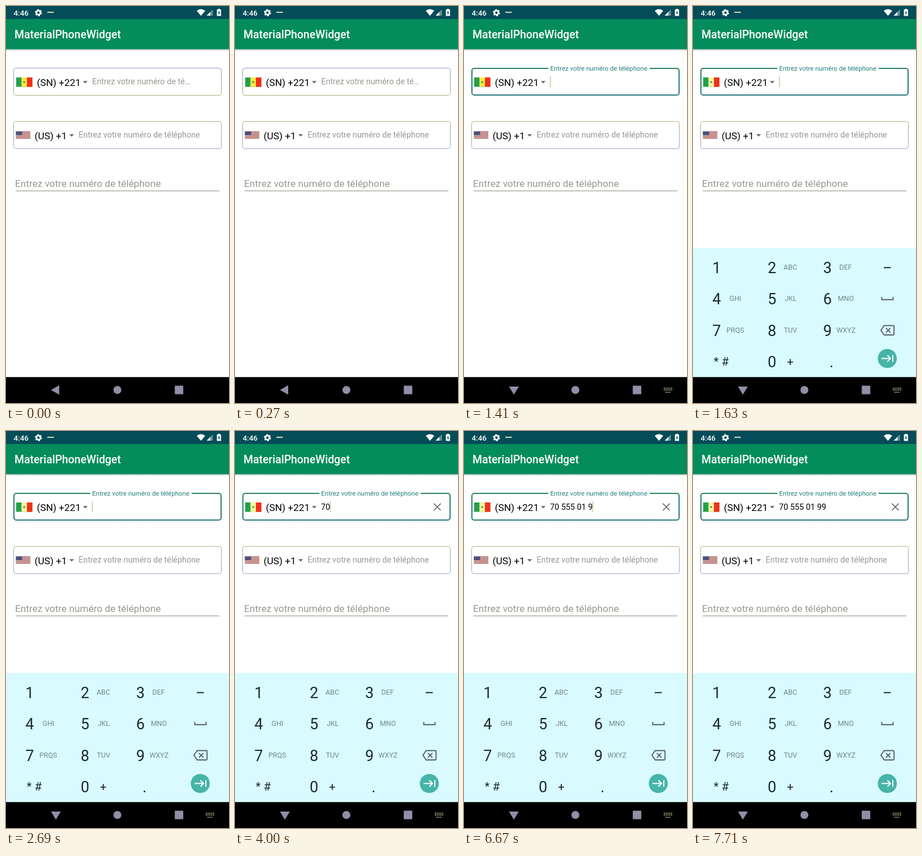
Animation, 394 px wide and 700 px high, one loop 8 s. Source, as an HTML page:

```html
<!DOCTYPE html>
<html lang="fr">
<head>
<meta charset="utf-8">
<title>MaterialPhoneWidget</title>
<style>
  html, body { margin: 0; width: 100%; height: 100%; overflow: hidden; background: #fff; }
  svg { display: block; width: 394px; height: 700px; font-family: Roboto, sans-serif; }
  .hint { fill: #97978f; }
  .body { font-size: 14.37px; }
  .large { font-size: 17.25px; }
  .digit { font-size: 27px; fill: #1c2a2e; }
  .sym { font-size: 20.5px; fill: #1c2a2e; }
  .sub { font-size: 12.4px; fill: #73858f; }
  .line { fill: none; stroke: #53606c; stroke-width: 1.9; }
  .cross { fill: none; stroke: #666; stroke-width: 1.7; }
</style>
</head>
<body>
<svg viewBox="0 0 394 700">
  <defs>
    <linearGradient id="idleA" x2="0" y2="1"><stop stop-color="#9797ce"/><stop offset="1" stop-color="#adad70"/></linearGradient>
    <linearGradient id="idleB" x2="0" y2="1"><stop stop-color="#b0b074"/><stop offset="1" stop-color="#a0a0cc"/></linearGradient>
    <linearGradient id="focus" x2="0" y2="1"><stop stop-color="#2a845c"/><stop offset="1" stop-color="#2a7880"/></linearGradient>
    <linearGradient id="shade" x2="0" y2="1"><stop stop-color="#b9c4c0"/><stop offset="1" stop-color="#fff"/></linearGradient>
  </defs>
  <rect width="394" height="700" fill="#fff"/>

  <!-- Status and title bars -->
  <rect width="394" height="23" fill="#034c58"/>
  <rect y="23" width="394" height="53.5" fill="#058c5c"/>
  <rect y="76.5" width="394" height="3" fill="url(#shade)"/>
  <g fill="#fff">
    <text x="13.5" y="17" font-size="13.4" font-weight="500">4:46</text>
    <g fill="none" stroke="#fff">
      <circle cx="57.3" cy="11.8" r="3.6" stroke-width="2.8"/>
      <circle cx="57.3" cy="11.8" r="5.3" stroke-width="2" stroke-dasharray="2.8 2.75"/>
    </g>
    <rect x="73" y="10" width="11.5" height="2.2" fill="#c5d2b8"/>
    <path d="M337 8.6Q344.5 2.6 352 8.6L344.5 17.3Z"/>
    <path d="M365.5 6V17H354.5Z" opacity=".4"/>
    <path d="M361 10.5V17H354.5Z"/>
    <path d="M374.5 6.3V5H378V6.3H380V17.5H372.6V6.3Z"/>
    <path d="M377 8L374.2 12.6H376L375.6 16L378.5 11.4H376.7Z" fill="#034c58"/>
    <text x="15" y="57" font-size="19.42" font-weight="500">MaterialPhoneWidget</text>
  </g>

  <!-- First field -->
  <rect id="outline" rx="4" fill="none"/>
  <rect id="notch" x="149" y="107" width="179" height="5" fill="#fff"/>
  <rect x="18" y="126" width="28.5" height="16.5" fill="#24a04c"/>
  <rect id="band" x="27.3" y="126" width="9.7" height="16.5"/>
  <rect x="37" y="126" width="9.5" height="16.5" fill="#f52f1a"/>
  <path d="M32.2 131.4L33 133.2H34.8L33.4 134.4L33.9 136.3L32.2 135.2L30.5 136.3L31 134.4L29.6 133.2H31.4Z" fill="#3c9a45"/>
  <text class="large" x="54.5" y="140.5">(SN) +221</text>
  <path d="M135.8 132.2H144.2L140 136.4Z" fill="#6b6b6b"/>
  <text id="label" x="152.3"></text>
  <text id="number" class="body" x="152" y="138.7"></text>
  <rect id="cursor" y="124" width="1" height="19" fill="#b5b56a"/>
  <path id="clear" class="cross" d="M351.3 127.8L363.5 140M363.5 127.8L351.3 140"/>
  <circle id="touch" cx="215.8" cy="133" r="11" fill="#fff" fill-opacity=".55" stroke="#b9b9ef" stroke-width="1.3"/>

  <!-- Second field -->
  <rect x="13.5" y="203.5" width="367" height="48" rx="4" fill="none" stroke="url(#idleB)"/>
  <g id="usFlag"><rect x="17.5" y="221" width="25.5" height="13" fill="#e9dccf"/></g>
  <text class="large" x="50.6" y="234.5">(US) +1</text>
  <path d="M111.8 226H120.2L116 230.2Z" fill="#6b6b6b"/>
  <text class="body hint" x="128.3" y="232">Entrez votre numéro de téléphone</text>

  <!-- Third field -->
  <text class="large hint" x="16" y="319">Entrez votre numéro de téléphone</text>
  <rect x="17" y="325.5" width="360" height="1" fill="#86867a"/>

  <!-- Keyboard -->
  <g id="keyboard">
    <rect y="426.5" width="394" height="228" fill="#d9fbff"/>
    <g id="keys"></g>
    <text class="sym" x="36.5" y="634">* #</text>
    <text class="sym" x="166" y="634">+</text>
    <rect x="337" y="460.3" width="12.5" height="2" fill="#1c2a2e"/>
    <path class="line" d="M333.5 513V517.8H353.5V513"/>
    <path class="line" d="M337.8 563.5H353.7Q355.2 563.5 355.2 565V578.5Q355.2 580 353.7 580H337.8L332 571.8ZM340.8 567.8L348.8 575.8M348.8 567.8L340.8 575.8"/>
    <circle cx="343.3" cy="621.5" r="16.8" fill="#46b4a9"/>
    <path d="M333 621.5H349M343.5 616L349 621.5L343.5 627M353 615.5V627.5" fill="none" stroke="#fff" stroke-width="2"/>
  </g>

  <!-- Navigation bar -->
  <rect y="654.3" width="394" height="45.7"/>
  <g fill="#928ea9">
    <path id="back"/>
    <circle cx="196.8" cy="677" r="7"/>
    <rect x="298.2" y="669.6" width="15" height="15" rx="1"/>
  </g>
  <path id="imeIcon" d="M353 674H368.5M353 677H368.5M356 681H365.5" fill="none" stroke="#a3a37c" stroke-width="1.8" stroke-dasharray="1.9 1.3"/>
</svg>
<script>
const LOOP = 8000, FOCUS = 1190, KEYBOARD = 1630, FLOAT = 180;
const HINT = "Entrez votre numéro de téléphone";
const PHONE = "70 555 01 99";
// time, characters shown, cursor visible
const TYPING = [
  [0, 0, 0], [1280, 0, 1], [2160, 0, 0], [2690, 0, 1], [3170, 0, 0],
  [3210, 1, 1], [4000, 2, 1], [4350, 2, 0], [4610, 4, 1], [4960, 5, 1],
  [5540, 6, 1], [5760, 6, 0], [6070, 8, 1], [6450, 9, 1], [6670, 11, 1],
  [7190, 12, 1], [7710, 12, 0]
];
// Both outlines share the same outer edge.
const IDLE = { x: 13.5, y: 109.5, width: 367, height: 48, stroke: "url(#idleA)", "stroke-width": 1 };
const ACTIVE = { x: 14, y: 110, width: 366, height: 47, stroke: "url(#focus)", "stroke-width": 2 };

const $ = id => document.getElementById(id);
const set = (el, attrs) => { for (const k in attrs) el.setAttribute(k, attrs[k]); };
const show = (id, on) => set($(id), { visibility: on ? "visible" : "hidden" });
const mix = (a, b, p) => a + (b - a) * p;

function add(parent, tag, attrs, text = "") {
  const el = document.createElementNS("http://www.w3.org/2000/svg", tag);
  set(el, attrs);
  el.textContent = text;
  parent.append(el);
}

function build() {
  const letters = ["", "ABC", "DEF", "GHI", "JKL", "MNO", "PRQS", "TUV", "WXYZ"];
  const subX = [[0, 160, 258.5], [64.5, 162, 256], [59, 160.5, 253.5]];
  letters.forEach((word, i) => {
    const row = Math.floor(i / 3), col = i % 3, y = 471 + row * 55.4;
    add($("keys"), "text", { class: "digit", x: 34.3 + col * 97.8, y }, i + 1);
    add($("keys"), "text", { class: "sub", x: subX[row][col], y: y - 6.3 }, word);
  });
  add($("keys"), "text", { class: "digit", x: 132.1, y: 637 }, "0");
  add($("keys"), "text", { class: "digit", x: 241.3, y: 637 }, ".");
  for (let i = 0; i < 7; i++)
    add($("usFlag"), "rect", { x: 17.5, y: 221 + i * 2, width: 25.5, height: 1, fill: "#a5484c" });
  add($("usFlag"), "rect", { x: 17.5, y: 221, width: 11, height: 7, fill: "#50507e" });
}

function draw(t) {
  const focused = t >= FOCUS, p = Math.min(1, Math.max(0, (t - FOCUS) / FLOAT));
  const eased = p * p * (3 - 2 * p);
  set($("outline"), focused ? ACTIVE : IDLE);
  show("notch", focused);
  $("label").textContent = p < .5 ? "Entrez votre numéro de té…" : HINT;
  set($("label"), {
    y: mix(138, 114, eased),
    "font-size": mix(14.37, 11.5, eased),
    fill: focused ? "#207f7c" : "#97978f"
  });
  show("touch", t >= 970 && !focused);

  const [, count, blink] = TYPING.findLast(step => t >= step[0]);
  const number = $("number");
  number.textContent = PHONE.slice(0, count);
  const width = count ? number.getComputedTextLength() : 0;
  set($("cursor"), { x: Math.round(152 + width) });
  show("cursor", blink);
  show("clear", count);

  const typing = t >= KEYBOARD;
  show("keyboard", typing);
  set($("band"), { fill: typing ? "#fbf3a0" : "#fdea48" });
  const ime = t >= 1280;
  show("imeIcon", ime);
  set($("back"), { d: ime ? "M79.5 671H96.8L88.1 685.3Z" : "M94 668.8V685.2L79.6 677Z" });
}

build();
const start = performance.now();
function tick() {
  draw((performance.now() - start) % LOOP);
  requestAnimationFrame(tick);
}
tick();
</script>
</body>
</html>
```
